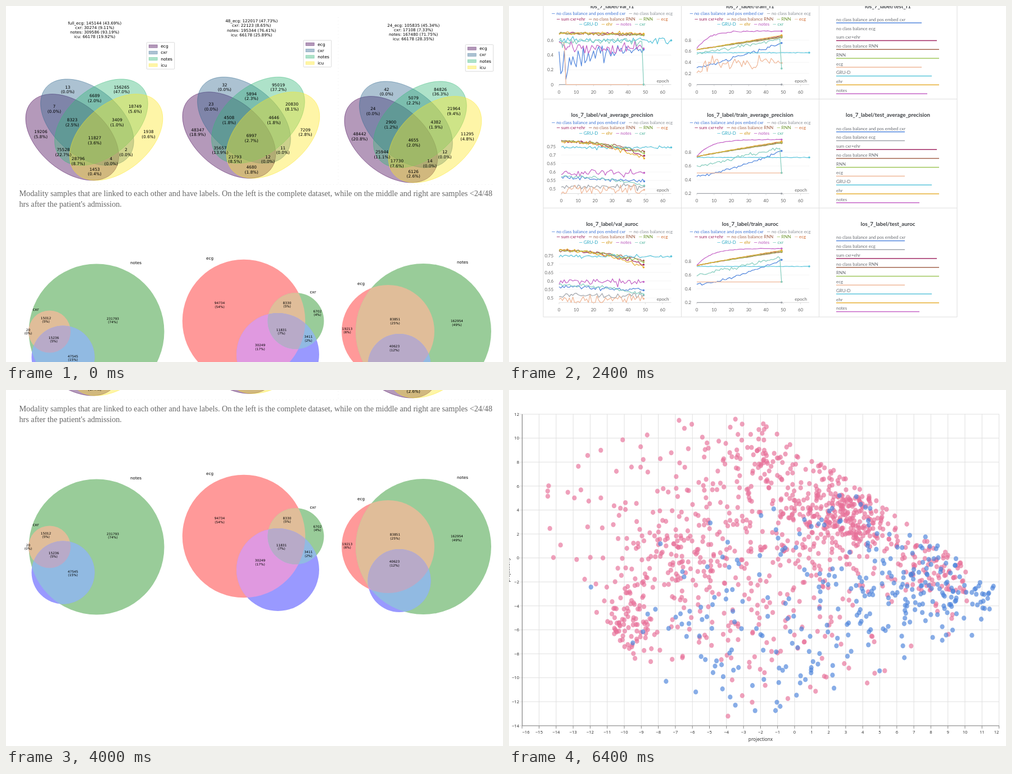
Animation of 884 by 633 pixels, one loop 7200 ms. Source, as an HTML page:

```html
<!DOCTYPE html>
<html lang="en">
<head>
<meta charset="utf-8">
<title>Experiment report</title>
<style>
  html, body { margin: 0; width: 100%; height: 100%; overflow: hidden; background: #fff; }
  svg { display: block; }
  #stage { width: 100%; height: 100%; }
  text { white-space: pre; }
  .plot { font-family: "DejaVu Sans", sans-serif; }
  .ui { font-family: Lato, sans-serif; }
  .axis { font-family: "Noto Sans", sans-serif; }
  .mid { text-anchor: middle; }
  .end { text-anchor: end; }
  .bold { font-weight: 700; }
</style>
</head>
<body>
<svg id="stage" viewBox="0 0 884 633"></svg>
<script>
const SLOT = 800;

// ---- helpers ----
const text = (x, y, s, size, cls = '', fill = '#000', more = '') =>
  `<text x="${x}" y="${y + size * 0.36}" font-size="${size}" class="${cls}" fill="${fill}" ${more}>${s}</text>`;
const line = (x1, y1, x2, y2, color, w = 1) =>
  `<path d="M${x1} ${y1}L${x2} ${y2}" stroke="${color}" stroke-width="${w}" fill="none"/>`;
const rect = (x, y, w, h, fill, more = '') =>
  `<rect x="${x}" y="${y}" width="${w}" height="${h}" fill="${fill}" ${more}/>`;
const circle = (x, y, r, fill, more = '') => `<circle cx="${x}" cy="${y}" r="${r}" fill="${fill}" ${more}/>`;
const group = (cls, body, dx = 0, dy = 0) => `<g class="${cls}" transform="translate(${dx} ${dy})">${body}</g>`;
const range = (from, to, step = 1) =>
  Array.from({ length: Math.floor((to - from) / step + 1e-6) + 1 }, (_, i) => from + i * step);
const each = (list, draw) => list.map(draw).join('');
const sum = list => list.reduce((a, b) => a + b, 0);

function random(seed) {
  return () => {
    seed = (seed + 0x6D2B79F5) | 0;
    let v = Math.imul(seed ^ (seed >>> 15), 1 | seed);
    v = (v + Math.imul(v ^ (v >>> 7), 61 | v)) ^ v;
    return ((v ^ (v >>> 14)) >>> 0) / 4294967296;
  };
}
const normal = rnd => Math.sqrt(-2 * Math.log(1 - rnd())) * Math.cos(6.2832 * rnd());

// ---- Venn page ----
const MODALITIES = [['ecg', '#440154'], ['cxr', '#30688e'], ['notes', '#35b779'], ['icu', '#fde725']];
const UNIT = 266, RX = .36, RY = .225;
const ELLIPSES = [[.35, .4, 40], [.45, .5, 40], [.544, .5, -40], [.644, .4, -40]];
const LEFT = [[.32, .72], [.23, .59], [.35, .5], [.14, .42], [.29, .3], [.39, .24]];
const REGIONS = [...LEFT, ...LEFT.map(([x, y]) => [1 - x, y]), [.5, .66], [.5, .38], [.5, .17]];

function inEllipse([x, y], [cx, cy, turn]) {
  const a = -turn * Math.PI / 180, dx = x - cx, dy = y - cy;
  const u = dx * Math.cos(a) + dy * Math.sin(a), v = dy * Math.cos(a) - dx * Math.sin(a);
  return (u / RX) ** 2 + (v / RY) ** 2 < 1;
}

// Set totals and shares follow from the region counts.
function ellipseVenn(x0, y0, prefix, counts) {
  const all = sum(counts);
  const faces = each(ELLIPSES, ([x, y, turn], i) => `<ellipse rx="${RX * UNIT}" ry="${RY * UNIT}"
    transform="translate(${x * UNIT} ${-y * UNIT}) rotate(${turn})" fill="${MODALITIES[i][1]}"
    stroke="${MODALITIES[i][1]}" stroke-width=".9" fill-opacity=".4" stroke-opacity=".5"/>`);
  const labels = each(counts, (n, i) => {
    const x = REGIONS[i][0] * UNIT, y = -REGIONS[i][1] * UNIT;
    return text(x, y - 4.3, n, 7.3, 'mid') + text(x, y + 4.3, `(${(n / all * 100).toFixed(1)}%)`, 7.3, 'mid');
  });
  const head = each(MODALITIES, ([name], i) => {
    const n = sum(counts.filter((_, r) => inEllipse(REGIONS[r], ELLIPSES[i])));
    return text(133, -309.5 + i * 8.2, `${i ? '' : prefix}${name}: ${n} (${(n / all * 100).toFixed(2)}%)`, 7.2, 'mid');
  });
  const key = rect(225.5, -275, 49.5, 47.5, '#fff', 'stroke="#ccc" stroke-width=".7" rx="1"') +
    each(MODALITIES, ([name, c], i) =>
      rect(229.5, -270.7 + i * 11.2, 15, 5.2, c, `fill-opacity=".4" stroke="${c}" stroke-opacity=".5" stroke-width=".7"`) +
      text(250.5, -268.2 + i * 11.2, name, 7.5));
  return group('plot', faces + labels + head + key, x0, y0);
}

function circleVenn(id, all, discs, names, counts) {
  const disc = (i, fill, more) => circle(...discs[i], fill, more);
  const clip = i => `clip-path="url(#${id}${i})"`;
  return `<defs>${each(discs, (d, i) => `<clipPath id="${id}${i}">${circle(...d, '#000')}</clipPath>`)}</defs>` +
    disc(0, '#f99') + disc(1, '#9c9') + disc(2, '#99f') +
    disc(1, '#e0bd99', clip(0)) + disc(2, '#e099e0', clip(0)) + disc(2, '#91bae2', clip(1)) +
    `<g ${clip(0)}>${disc(2, '#b8aac8', clip(1))}</g>` +
    group('plot', each(names, ([x, y, s]) => text(x, y, s, 7.2, 'mid')) +
      each(counts, ([x, y, n]) => text(x, y - 3.3, n, 5.8, 'mid') +
        text(x, y + 3.3, `(${Math.round(n / all * 100)}%)`, 5.8, 'mid')));
}

function vennPage(scroll) {
  const caption = ['Modality samples that are linked to each other and have labels. On the left is the complete dataset, while on the middle and right are samples &lt;24/48',
    "hrs after the patient's admission."];
  return group('', `<path d="M24 317.5H867M591 20V317" stroke="#e4e4e4" stroke-width=".7" stroke-dasharray="1 5"/>` +
    ellipseVenn(24.7, 339.7, 'full_',
      [13, 7, 8323, 19206, 75528, 28796, 156265, 18749, 3409, 1938, 2, 4, 6689, 11827, 1453]) +
    ellipseVenn(303.7, 336, '48_',
      [32, 23, 4508, 48347, 35657, 21793, 95019, 20830, 4646, 7209, 11, 12, 5894, 6997, 4680]) +
    ellipseVenn(591.7, 343.7, '24_',
      [42, 24, 2900, 48442, 25944, 17730, 84826, 21964, 4382, 11295, 12, 14, 5079, 4655, 6126]) +
    each(caption, (s, i) => text(23.5, 333 + i * 18.5, s, 14.18, '', '#666', 'font-family="Liberation Serif, serif"')) +
    circleVenn('a', 313e3, [[77.5, 579, 37.5], [161, 579, 120.5], [101.5, 624.5, 56]],
      [[231, 456, 'notes'], [53, 539, 'cxr']],
      [[71, 558, 15012], [190, 559, 231793], [39.5, 579, 20], [85, 593, 15236], [119, 626, 47545]]) +
    circleVenn('b', 175e3, [[423, 560, 109.3], [515.5, 560, 50], [483.5, 619.5, 73.5]],
      [[362.5, 448, 'ecg'], [546, 508, 'cxr']],
      [[380, 531.5, 94734], [500, 531, 8330], [554, 546, 6702], [490, 579, 11831], [538, 591.5, 3411], [452, 606.5, 30249]]) +
    circleVenn('c', 332e3, [[679.5, 578.5, 82.5], [742.5, 578.5, 120.5], [699.5, 639, 56]],
      [[631.5, 493, 'ecg'], [812, 455, 'notes']],
      [[802, 563.5, 162954], [692, 560.5, 83851], [607, 577, 19213], [691, 608.5, 40623]]), 0, -scroll);
}

// ---- label balance bars ----
const COHORTS = [['icu', 66178], ['ecg', 105835], ['cxr', 17108], ['notes', 167480]];
// Size of the smaller class per cohort
const TASKS = [['los_7_label', 30592, 22770, 6434, 44379], ['los_3_label', 11752, 51771, 4562, 62372],
  ['readmission_label', 12401, 20736, 4011, 35120], ['disch_label', 6879, 3255, 1288, 6292]];

// Smallest round step that gives at most nine intervals
function niceStep(max) {
  const power = 10 ** Math.floor(Math.log10(max / 9));
  return power * [1, 2, 5, 10].find(k => max / (k * power) <= 9);
}

function barPage() {
  const W = 169.6, H = 162;
  return group('plot', each(TASKS, ([task, ...minor], row) => {
    const top = -6.3 + row * 186.2, base = top + H;
    return text(436, top - 11.6, 'Task: ' + task, 5.5, 'mid bold') + each(COHORTS, ([name, all], col) => {
      const x = 76 + col * 187.9, major = all - minor[col], max = major * 1.05, y = v => base - v / max * H;
      const bar = (v, i, fill) => {
        const mid = x + W * (.25 + i / 2);
        return rect(mid - W / 8, y(v), W / 4, base - y(v), fill) +
          text(mid, y(v) - 2.6, `${v} (${(v / all * 100).toFixed(2)}%)`, 4.7, 'mid bold') +
          text(0, 0, row === 1 ? 1 - i : i, 3.8, 'mid', '#000', `transform="translate(${mid} ${base + 3.2}) rotate(-90)"`);
      };
      return bar(major, 0, '#a6cee3') + bar(minor[col], 1, '#1f78b4') +
        rect(x, top, W, H, 'none', 'stroke="#222" stroke-width=".6"') +
        text(x + W / 2, top - 4.3, 'Modality: ' + name, 5, 'mid bold') +
        each(range(0, max, niceStep(max)), v => line(x - 1.5, y(v), x, y(v), '#222', .5) + text(x - 2.3, y(v), v, 3.8, 'end'));
    });
  }));
}

// ---- training curves ----
// [name, line colour, legend text colour]
const RUNS = [
  ['no class balance and pos embed cxr', '#5387dd', '#3f74d4'], ['no class balance ecg', '#a1a5ab', '#8b9097'],
  ['sum cxr+ehr', '#a12864', '#a12864'], ['no class balance RNN', '#a46750', '#a46750'], ['RNN', '#a0c75c', '#6d952e'],
  ['ecg', '#f0b899', '#d0682c'], ['GRU-D', '#5bc5db', '#2aa9c4'], ['ehr', '#e7b036', '#cf9413'],
  ['notes', '#c565c7', '#b853ba'], ['cxr', '#87cebf', '#4bb39c']];
const [FIRST, PLAIN_ECG, , , , ECG, GRU, EHR, NOTES, CXR] = RUNS.keys();

// Curves over training progress t = 0..1
const flat = v => () => v;
const ramp = (a, b, power = 1) => t => a + (b - a) * t ** power;
const settle = (a, b, rate, drift = 0) => t => b + (a - b) * Math.exp(-rate * t) + drift * t ** 3;
const shaky = (noise, curve) => Object.assign(t => curve(t), { noise });
// Four runs share a course and fan out by `spread` at the end.
const fan = (a, b, power, spread) => k => ramp(a, b + spread * k, power);
const runs = (first, plainEcg, fused, ecg, gru, notes, cxr) =>
  [first, plainEcg, fused(.2), fused(-1), fused(-.5), ecg, gru, fused(1), notes, cxr];

const precisionVal = { lo: .473, hi: .793, ticks: range(.5, .75, .05), noise: .005, runs: runs(
  ramp(.57, .545), shaky(.008, flat(.515)), fan(.78, .7, 2, -.02), shaky(.015, flat(.495)), flat(.745),
  shaky(.011, flat(.595)), ramp(.575, .52, 2)) };
const precisionTrain = { lo: .2, hi: .989, ticks: range(.2, .8, .2), noise: .002, crash: .5, runs: runs(
  shaky(.01, ramp(.46, .82, 1.4)), flat(.2), fan(.735, .945, .9, .012), flat(.5), flat(.725),
  settle(.74, .985, 6), shaky(.014, ramp(.59, .86))) };
const CHARTS = {
  val_loss: { lo: .545, hi: 2.14, ticks: range(1, 2, .5), noise: .005, crash: .7, runs: runs(
    shaky(.07, ramp(.74, 1.28, 2.2)), shaky(.02, flat(.94)), fan(.565, .97, 3, .12), flat(.7), flat(.6),
    shaky(.12, settle(.7, 1.38, 9, .75)), shaky(.05, ramp(.68, .95, 1.5))) },
  train_loss_epoch: { lo: .057, hi: .7, ticks: range(.1, .7, .1), noise: .002, crash: .695, runs: runs(
    shaky(.012, ramp(.62, .395, 1.9)), flat(.493), fan(.585, .28, 1.9, -.03), flat(.695), flat(.615),
    shaky(.015, settle(.64, .15, 9, -.09)), shaky(.015, ramp(.66, .48))) },
  val_f1: { lo: 0, hi: .737, ticks: range(0, .6, .2), noise: .01, crash: 0, runs: runs(
    shaky(.04, t => .5 - .5 * Math.exp(-3 * t) * Math.abs(Math.sin(55 * t))), shaky(0, flat(0)),
    fan(.7, .68, 1, .01), shaky(0, t => t < .07 ? .57 : 0), shaky(.02, flat(.6)),
    shaky(.04, settle(.62, .49, 20)), shaky(.028, flat(.59))) },
  train_f1: { lo: 0, hi: .98, ticks: range(0, .8, .2), noise: .003, crash: .29, runs: runs(
    shaky(.015, settle(.2, .33, 20, 0)), shaky(0, flat(0)), fan(.63, .87, 1, .02), shaky(.05, settle(.27, .39, 20)),
    flat(.575), shaky(.006, settle(.65, .965, 7)), shaky(.015, ramp(.56, .82))) },
  val_average_precision: precisionVal, train_average_precision: precisionTrain,
  val_auroc: precisionVal, train_auroc: precisionTrain
};
CHARTS.train_f1.runs[FIRST] = shaky(.015, ramp(.31, .75, 1.2));

function chart(name, x0, x1, top, bottom, size) {
  const { lo, hi, ticks, noise, crash, runs } = CHARTS[name], last = 65, rnd = random(name.length * 31);
  const X = e => x0 + e / last * (x1 - x0), Y = v => bottom - (v - lo) / (hi - lo) * (bottom - top);
  const gap = x1 - x0 > 250 ? 16 : 13;
  const axes = each(ticks, v => line(x0, Y(v), x1, Y(v), '#f3f3f3', .8) +
    text(x0 - 10, Y(v), +v.toFixed(2), size, 'end', '#666')) + line(x0, bottom, x1, bottom, '#ddd') +
    each(range(0, 60, 10), e => line(X(e), bottom, X(e), bottom + 3, '#ddd') + text(X(e), bottom + gap, e, size, 'mid', '#666'));
  const curves = each(runs, (curve, i) => {
    const end = i === GRU ? last : 49, still = i === PLAIN_ECG || i === ECG ? 0 : noise;
    const value = e => {
      if (e === end && i === CXR && crash !== undefined) return crash;
      const wobble = e < end ? (curve.noise ?? still) * normal(rnd) : 0;
      return Math.max(lo, Math.min(hi, curve(e / end) + wobble));
    };
    const points = range(0, end).map(e => `${X(e).toFixed(1)},${Y(value(e)).toFixed(1)}`);
    return `<polyline points="${points.join(' ')}" fill="none" stroke="${RUNS[i][1]}" stroke-width="1.25" stroke-linejoin="round"/>` +
      circle(...points[end].split(','), 1.8, RUNS[i][1]);
  });
  return axes + curves +
    text(x1 - 4, bottom - gap / 2, 'epoch', size + .2, 'end', '#666', 'stroke="#fff" stroke-width="1.5" paint-order="stroke"');
}

function legend(x, y, counts, suffix = '') {
  let first = 0;
  return each(counts, (n, row) => {
    const items = RUNS.slice(first, first += n).map(([name, c, ink]) =>
      `<tspan fill="${c}" font-weight="900">—</tspan><tspan fill="${ink}"> ${name}${suffix}</tspan>`);
    return text(x, y + row * 9.5, items.join('   '), 7.9, 'mid');
  });
}

function testLength(metric, run) {
  const f1 = metric === 'f1';
  if (run === GRU) return 170;
  if (run === NOTES) return f1 ? 162 : 148;
  if (run === PLAIN_ECG && f1) return 0;
  if (run === FIRST || run === PLAIN_ECG || run === ECG) return f1 ? 152 : 122;
  return run === 2 ? 179 : 183;
}

function panelPage(scroll) {
  const edge = '#dfdfdf', ROW = 193.75, xs = [61, 306.5, 551.5, 797];
  return group('ui', each(['loss', 'f1', 'average_precision', 'auroc'], (metric, row) => {
    const top = -28.3 + row * ROW, low = top + ROW, isLoss = !row, prefix = isLoss ? '' : 'los_7_label/';
    const frame = line(61, low, 797, low, edge) + each(xs.slice(0, isLoss ? 3 : 4), x => line(x, top, x, low, edge));
    const plots = each(['val', 'train'], (split, col) => {
      const name = isLoss && col ? 'train_loss_epoch' : `${split}_${metric}`, mid = xs[col] + 122.5;
      const x0 = col ? 334 : metric === 'average_precision' ? 93 : 89;
      return text(mid, top + 28.5, prefix + name, 9.7, 'mid bold', '#3c3f43') +
        (isLoss ? text(mid, top + 41.3, 'Showing first 10 runs', 8.2, 'mid', '#888') : '') +
        legend(mid, top + (isLoss ? 51.3 : 41.5), [2, 4, 4]) +
        chart(name, x0, col ? 534 : 288.5, top + (isLoss ? 81.3 : 71.5), top + 168, 7.9);
    });
    const tests = isLoss ? '' : text(674, top + 28.5, `${prefix}test_${metric}`, 9.7, 'mid bold', '#3c3f43') +
      each(RUNS.slice(0, CXR), ([name, c], i) => {
        const y = top + 52.3 + i * 15.75;
        return text(582, y, name, 7.9, '', '#6b6e73') + line(582, y + 5.9, 582 + testLength(metric, i), y + 5.9, c, 1.5);
      });
    return frame + plots + tests;
  }), 0, -scroll);
}

// ---- run table ----
function tablePage() {
  const edge = '#e0e0e0', ink = '#3a3d42', soft = '#9a9da2', blue = '#2f7bd0', S = 10.7;
  const runtimes = ['7h 26m 37s', '1d 5h 37m', '1d 1h 21m', '20h 12m 1s', '21h 17m 2s', '1d 23h 2m', '1d 13h 34m', '23h 3m 20s', '2d 1h 2m 9s', '7h 51m 44s'];
  const batchSize = i => i === FIRST || i === CXR ? 64 : i === 2 || i >= GRU ? 32 : 96;
  const columns = [[261, 'State'], [323, 'Notes'], [385, 'User'], [433, 'Tags'], [481, 'Created'], [543, 'Runtime'],
    [605, 'Sweep'], [667, 'accelerator'], [728, 'attn_heads'], [790, 'batch']];
  const eye = (x, y) => group('', `<path d="M-6 0Q0-9 6 0Q0 9-6 0Z" fill="${blue}"/>` +
    circle(0, 0, 3, '#fff') + circle(0, 0, 1.9, blue), x, y);
  const tab = (x, name, n, nx) => rect(x, 261, 12, 12, '#fff', 'stroke="#c4c8cc" rx="1.5"') +
    `<path d="M${x + 3} 267l2.3 2.3 4-4.6" fill="none" stroke="${blue}" stroke-width="1.2"/>` +
    text(x + 21, 267, name, S, '', ink) + text(nx, 267, n, S, '', soft) +
    each([-4, 0, 4], d => circle(nx + (n ? 27 : 21), 267 + d, .9, '#777'));

  const charts = each(['val_loss', 'train_loss_epoch'], (name, i) => {
    const left = 61 + i * 368, mid = left + 184;
    return text(mid, 2, name, 10.8, 'mid bold', ink) + text(mid, 15.5, 'Showing first 10 runs', 8.4, 'mid', '#888') +
      legend(mid, 26, [3, 5, 2], ' los_7') + chart(name, left + 30, left + 349, 56.5, 204.5, 8.9) +
      line(left, 0, left, 230.5, edge);
  }) + `<path d="M61 230.5H797V0" fill="none" stroke="${edge}"/>`;

  const head = rect(61, 247.5, 736, 40, '#f3f3f3') + rect(61, 247.5, 108, 40, '#fafaf8') + rect(61, 287.5, 736, 29.5, '#fafaf9') +
    tab(72, 'los_7', 11, 124) + tab(188, 'los_3', 0, 240) + tab(298, 'mortality', 0, 368) +
    eye(90, 301.5) + text(100, 301.5, `Name <tspan fill="${soft}">(11 visualized)</tspan>`, S, '', ink) +
    each(columns, ([x, s]) => text(x, 301.5, s, S, '', ink)) + '<path d="M519 300h6l-3 3.5z" fill="#444"/>';

  const rows = each(RUNS, ([name, c], i) => {
    const y = 332.6 + i * 30.25, cell = (x, s, color = ink) => text(x, y, s, S, '', color);
    return eye(89.5, y) + circle(106, y, 5.5, c) + cell(117, i ? name : 'no class bala...os embed cxr') +
      rect(261, y - 7.7, 54, 15.4, '#d3f5e4', 'rx="3.5"') + circle(268.3, y, 4, 'none', 'stroke="#168a5e"') +
      `<path d="M266.4 ${y}l1.4 1.5 2.3-2.8" fill="none" stroke="#168a5e"/>` + text(275.5, y, 'Finished', 10.2, '', '#168a5e') +
      cell(323, '-', soft) + cell(385, 'oakfern') + cell(481, '10mo ago') + cell(605, '-') +
      cell(667, 'gpu') + cell(728, 4) + cell(790, batchSize(i)) +
      `<svg x="543" y="${y - 10}" width="47" height="20">${text(0, 10, runtimes[i], S, '', ink)}</svg>`;
  });

  const rules = `<path d="M61 633V247.5H797V633M61 287.5H797M61 317H797M254 287.5V619.5M61 619.5H797M169 247.5V287.5" fill="none" stroke="${edge}"/>`;
  return group('ui', charts + `<svg width="797.5" height="633">${head}${rows}${rules}</svg>` + text(697, 635.5, '1-10 of 11', S, '', '#555'));
}

// ---- embedding scatters ----
const BLUE = '#4a82db', PINK = '#e66f98', GRID = '#e0e0e0';
const dot = (x, y, color) => `<ellipse cx="${x.toFixed(1)}" cy="${y.toFixed(1)}" rx="4.1" ry="4.4" fill="${color}" fill-opacity=".66"/>`;
const signed = n => String(n).replace('-', '−');
const tickLabel = (x, y, n, cls) => text(x, y, signed(n), 7.6, cls, '#333');

// Normal cluster: centre, spread, count; points outside the hull are drawn again.
function cluster(rnd, color, [cx, cy, sx, sy, n], inside = () => true) {
  return each(range(1, n), () => {
    let x, y;
    do { x = cx + sx * normal(rnd); y = cy + sy * normal(rnd); } while (!inside(x, y));
    return dot(x, y, color);
  });
}

function sparseScatter() {
  const rnd = random(11), X = v => 507.5 + v * 31.75;
  const axes = line(0, 30, 884, 30, '#ddd') +
    each(range(43.5, 604, 37.4), y => line(0, y, 884, y, GRID)) +
    each(range(-16, 12), v => line(X(v), 43, X(v), 604, GRID) + line(X(v), 604, X(v), 609, '#888') + tickLabel(X(v), 616, v, 'mid')) +
    line(0, 604, 884, 604, '#888', 1.3) + text(443.5, 629, 'projectionx', 8.2, 'mid', '#333');
  const band = each(range(1, 175), i => {
    const t = rnd(), pink = i % 5 > 2;
    return dot(40 + (pink ? 150 : 190) * t, 174 - 80 * t ** .8 + normal(rnd) * 14 + (pink ? 8 : 0), pink ? PINK : BLUE);
  });
  const strays = cluster(rnd, BLUE, [195, 225, 32, 40, 16]) + cluster(rnd, PINK, [150, 205, 50, 22, 22]) +
    cluster(rnd, BLUE, [274, 79, 14, 3, 6]) + cluster(rnd, PINK, [400, 340, 40, 15, 7]) +
    cluster(rnd, PINK, [490, 495, 55, 42, 34]) + cluster(rnd, PINK, [630, 490, 28, 16, 12]);
  const lone = (color, points) => each(points, ([x, y]) => dot(x, y, color));
  return group('axis', axes + band + strays +
    lone(BLUE, [[294, 49], [314, 127], [258, 359], [303, 371], [413, 390], [432, 492], [485, 538], [601, 499], [855, 158]]) +
    lone(PINK, [[293, 66], [327, 140], [413, 123], [294, 327], [656, 388], [855, 158]]));
}

function denseScatter(seed) {
  const rnd = random(seed), X = v => 508 + v * 30.3, Y = v => 298.6 - v * 21.3;
  const inside = (x, y) => x > 60 && x < 864 && y > 48 && y < 590 && y > 115 + .72 * (x - 540) &&
    y > 160 - .55 * (x - 60) && y < 446 + .45 * (825 - x) && y < 480 + .55 * (x - 165) && y < 300 + 1.1 * (x - 60);
  const axes = each(range(-14, 12, 2), v => line(19, Y(v), 872, Y(v), GRID) + tickLabel(18, Y(v), v, 'end')) +
    each(range(-16, 12), v => line(X(v), 43, X(v), 597, GRID) + line(X(v), 597, X(v), 602, '#888') +
      tickLabel(Math.max(30, Math.min(867, X(v))), 608, v, 'mid')) +
    `<path d="M23.5 43V597H872" fill="none" stroke="#888" stroke-width="1.2"/>` +
    text(447.5, 621, 'projectionx', 8.2, 'mid', '#333') +
    text(0, 0, 'projectiony', 8.2, 'mid', '#333', 'transform="translate(-2 320) rotate(-90)"');
  const pink = [[400, 270, 170, 140, 480], [600, 220, 48, 38, 250], [480, 120, 55, 45, 80], [765, 320, 38, 30, 85],
    [310, 300, 45, 35, 60], [205, 430, 24, 40, 70]];
  const blue = [[480, 430, 170, 100, 150], [740, 345, 60, 42, 120], [845, 370, 15, 18, 16], [600, 240, 50, 40, 24]];
  return group('axis', axes + each(pink, c => cluster(rnd, PINK, c, inside)) + each(blue, c => cluster(rnd, BLUE, c, inside)));
}

// ---- playback ----
const scenes = [vennPage(0), barPage(), panelPage(0), panelPage(193.75), tablePage(), vennPage(300),
  sparseScatter(), denseScatter(5), denseScatter(23)];
const stage = document.getElementById('stage');
let shown = -1;

function play() {
  const slot = Math.floor(performance.now() / SLOT) % scenes.length;
  if (slot !== shown) stage.innerHTML = scenes[shown = slot];
  requestAnimationFrame(play);
}
play();
</script>
</body>
</html>
```
